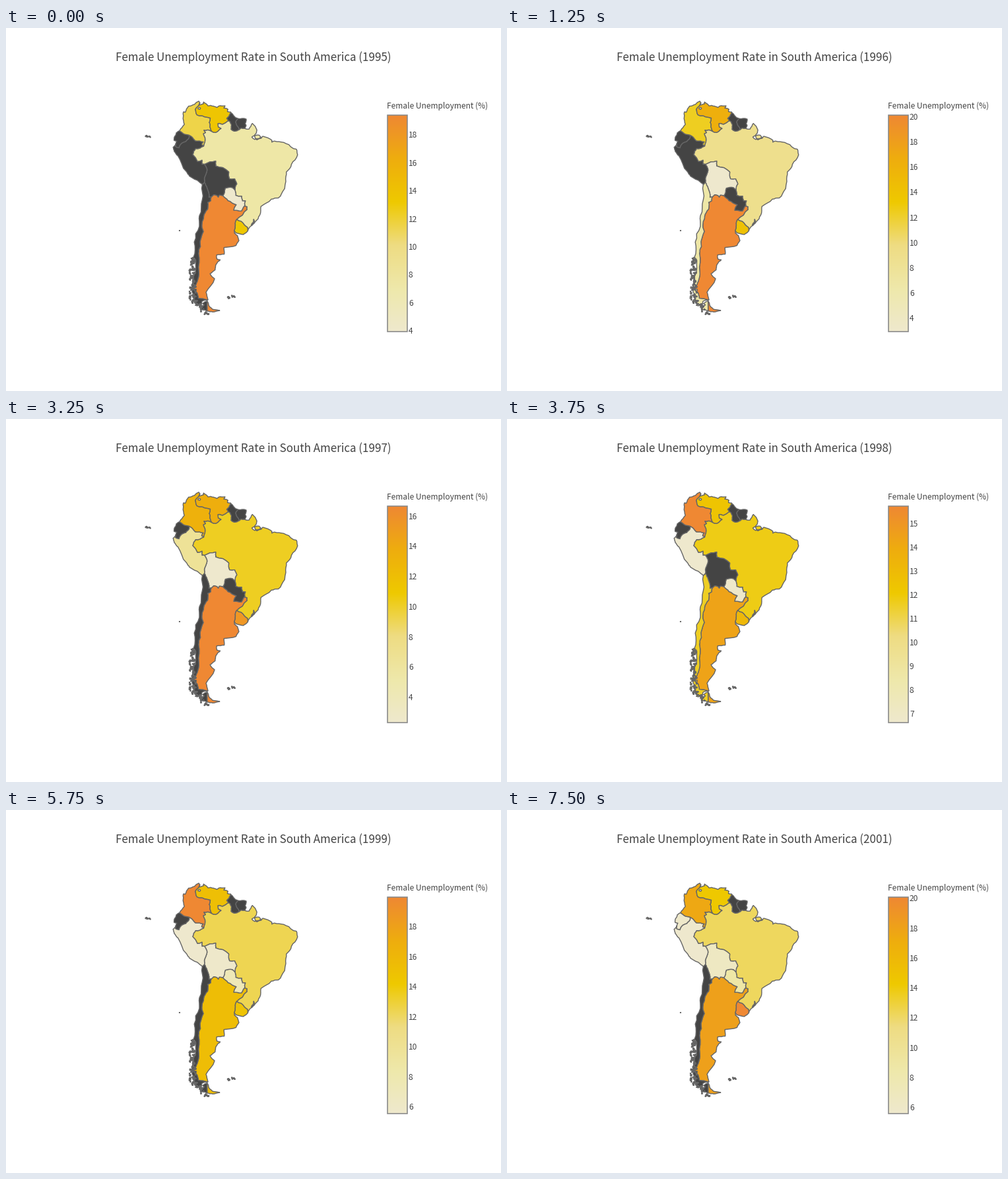
A matplotlib script for the animation above (8 s loop, 750 by 550 pixels).

```python
import numpy as np
import matplotlib.pyplot as plt
from matplotlib.animation import FuncAnimation
from matplotlib.colors import LinearSegmentedColormap
from matplotlib.patches import PathPatch, Rectangle
from matplotlib.path import Path

W, H, DPI = 750, 550, 100
PX = 72 / DPI
STEP_MS, STEPS_PER_YEAR, STEPS = 250, 5, 32
BAR_X, BAR_W, BAR_TOP, BAR_H = 578, 30, 132, 328
INK, EDGE, NO_DATA = "#444444", "#666666", "#444444"
plt.rcParams["font.family"] = ["Noto Sans CJK JP", "DejaVu Sans"]

rng = np.random.default_rng(4)
scale = LinearSegmentedColormap.from_list(
    "rate", ["#EEE8CD", "#EEE8AA", "#EEDC82", "#EEC900", "#EEAD0E", "#EF8833"], N=512)

# Unemployment in percent by year; countries left out have no data
rates = [
    dict(AR=19.43, BR=7.35, CO=11.5, PY=3.94, UY=13.5, VE=13.7),
    dict(AR=20.15, BO=2.94, BR=8.9, CL=6.7, CO=12.4, UY=14.3, VE=16.5),
    dict(AR=16.68, BO=2.33, BR=10.2, CO=13.4, PE=6.6, UY=15.5, VE=13.7),
    dict(AR=14.4, BR=11.8, CL=11.6, CO=15.74, PE=6.63, PY=6.8, UY=13.2, VE=12.4),
    dict(AR=15.4, BO=5.8, BR=12.4, CO=19.99, PE=5.55, PY=7.4, UY=14.8, VE=15.2),
    dict(AR=16.6, BO=6.1, CL=12.2, CO=18.17, EC=5.9, PE=4.94, UY=17.5, VE=13.3),
    dict(AR=18.2, BO=6.5, BR=12.2, CO=17.6, EC=5.9, PE=5.59, PY=8.8, UY=20.1, VE=14.4),
]


def arc(*lonlat):
    """Mercator line in pixels, roughened by midpoint displacement."""
    lon, lat = np.array(lonlat, float).reshape(-1, 2).T
    k = 4.057
    y = 161.6 - np.degrees(k * np.log(np.tan(np.pi / 4 + np.radians(lat) / 2)))
    p = np.column_stack([583 + k * lon, y])
    for _ in range(2):
        d = np.diff(p, axis=0)
        bump = rng.uniform(-0.1, 0.1, (len(d), 1))
        finer = np.empty((2 * len(p) - 1, 2))
        finer[::2] = p
        finer[1::2] = p[:-1] + d / 2 + bump * d[:, ::-1] * [1, -1]
        p = finer
    return p


def ring(first, *arcs):
    """Chain arcs, turning each so that it starts where the last one ended."""
    out = first
    for a in arcs:
        out = np.vstack([out, a if np.allclose(out[-1], a[0]) else a[::-1]])
    return out


def blob(x, y, r):
    a = np.linspace(0, 2 * np.pi, 8)[:-1]
    q = r * rng.uniform(0.6, 1.4, 7)
    return np.column_stack([x + q * np.cos(a), y + q * np.sin(a)])


def shape(*rings):
    return Path.make_compound_path(*[Path(np.vstack([r, r[:1]]), closed=True) for r in rings])


# Coasts
sea_br = arc(
    -51.7, 4.2, -50, 1.7, -50.3, 0.5, -51.9, -0.9, -50.8, -1.8, -48.5, -1.4, -47.8, -0.6,
    -44.4, -2.1, -44.4, -2.8, -43.4, -2.4, -40, -2.9, -36.5, -5.1, -35.2, -5.5, -34.8, -7.5,
    -37.1, -11, -39, -13.8, -39.2, -17.2, -41, -21.9, -42, -23, -44.6, -23.4, -48.5, -25.9,
    -48.9, -28.7, -50.7, -31, -52.3, -32.3, -53.4, -33.8)
sea_uy = arc(-53.4, -33.8, -55, -34.9, -57.8, -34.4, -58.4, -33.9)
sea_ar = arc(
    -58.4, -33.9, -58.4, -34.5, -57.2, -35.3, -56.7, -36.7, -57.8, -38.2, -62.3, -38.8,
    -62.2, -40.7, -65, -40.9, -64.9, -42.1, -63.7, -42.3, -65.2, -43.5, -65.6, -45,
    -67.5, -46, -65.8, -47.3, -69, -50.6, -68.3, -52.35)
sea_cl = arc(
    -70.4, -18.35, -70.4, -23.6, -71.5, -29, -71.5, -32.4, -73.4, -37.2, -73.7, -41.6,
    -72.8, -42.5, -73.6, -46.6, -74.2, -50.5, -72.9, -53.2, -71.2, -53.8, -70.5, -52.7,
    -68.3, -52.35)
sea_pe = arc(-80.3, -3.4, -81.3, -4.7, -80.9, -6.2, -79.5, -7.9, -76.3, -13.7, -75.2, -15.3,
             -71.4, -17.5, -70.4, -18.35)
sea_ec = arc(-78.9, 1.4, -80.1, 0.7, -80.9, -1.1, -80.9, -2.2, -79.9, -2.4, -80.3, -3.4)
sea_co = arc(-78.9, 1.4, -77.1, 3.8, -77.5, 6.7, -77.4, 8.5, -76.8, 8.3, -75.5, 10.6,
             -73.4, 11.2, -71.7, 12.4, -71.3, 11.8)
sea_ve = arc(-71.3, 11.8, -71.6, 11, -70, 11.4, -69.9, 12.1, -68.3, 10.7, -66.2, 10.6, -65, 10.1,
             -64.3, 10.6, -61.9, 10.7, -62.4, 9.9, -60.8, 9.4, -61, 8.6, -59.8, 8.4)
sea_gy = arc(-59.8, 8.4, -58.5, 6.9, -57.1, 6)
sea_sr = arc(-57.1, 6, -54, 5.8, -54.4, 4.2, -54, 3.4, -54.5, 2.3)

# Land borders
uy_br = arc(-53.4, -33.8, -53.5, -32.7, -55.7, -30.9, -57.6, -30.2)
ar_br = arc(-57.6, -30.2, -53.7, -26.9, -53.7, -26, -54.6, -25.7)
py_br = arc(-54.6, -25.7, -54.3, -24, -55.4, -24, -55.7, -22.4, -57.9, -22.1, -58.2, -20.2)
bo_br = arc(-58.2, -20.2, -57.5, -18.1, -58.3, -16.3, -60.2, -16.3, -60.5, -13.8, -65.4, -11.6,
            -65.4, -9.8, -69.5, -11)
pe_br = arc(-69.5, -11, -70.5, -11, -70.5, -9.5, -72.2, -10, -74, -7.4, -72.9, -5.2, -69.9, -4.3)
co_br = arc(-69.9, -4.3, -69.4, -1.1, -70, 0.4, -69.2, 0.8, -69.8, 1.7, -67.9, 1.7, -66.9, 1.25)
ve_br = arc(-66.9, 1.25, -65.5, 0.8, -63.4, 2.3, -64.4, 2.8, -64.6, 4.1, -62.8, 3.9, -60.7, 5.2)
gy_br = arc(-60.7, 5.2, -60, 4.8, -59.6, 3.9, -59.7, 2, -58.6, 1.3, -56.5, 1.9)
sr_br = arc(-56.5, 1.9, -55.9, 2.4, -54.5, 2.3)
gap_br = arc(-54.5, 2.3, -52.9, 2.1, -51.7, 4.2)
uy_ar = arc(-57.6, -30.2, -58.1, -32.5, -58.4, -33.9)
cl_ar = arc(
    -68.3, -52.35, -71.9, -52, -72.4, -50.7, -73.4, -50.2, -73.4, -49.2, -72.3, -48, -71.7, -45.5,
    -71.8, -40.5, -71.1, -38.5, -71.1, -36.6, -70, -34, -70.5, -31.4, -69.9, -29.2, -68.4, -26.8,
    -68.4, -24.5, -67.3, -24, -67.1, -22.7)
bo_ar = arc(-67.1, -22.7, -66.2, -21.9, -65, -22.1, -64.4, -22.7, -64, -22, -62.7, -22.2)
py_ar = arc(-62.7, -22.2, -60.8, -23.9, -57.7, -25.3, -58.6, -27.2, -55.8, -27.4, -54.6, -25.7)
bo_py = arc(-62.7, -22.2, -61.8, -19.6, -59.1, -19.4, -58.2, -20.2)
cl_bo = arc(-67.1, -22.7, -67.9, -22.8, -68.6, -19.6, -69.6, -17.6)
cl_pe = arc(-69.6, -17.6, -70.4, -18.35)
bo_pe = arc(-69.6, -17.6, -69.2, -15, -68.7, -12.5, -69.5, -11)
pe_ec = arc(-80.3, -3.4, -80.4, -4.4, -79.1, -4.9, -78, -3.1, -76.6, -2.6, -75.3, -1, -75.4, -0.15)
pe_co = arc(-75.4, -0.15, -74.3, -0.8, -73, -2.3, -70, -2.7, -70.6, -3.8, -69.9, -4.3)
ec_co = arc(-75.4, -0.15, -77.5, 0.4, -78.9, 1.4)
co_ve = arc(-71.3, 11.8, -73, 9.4, -72.4, 7.4, -70.3, 7, -67.4, 6.2, -67.8, 4.6, -67.5, 2.7,
            -66.9, 1.25)
gy_sr = arc(-57.1, 6, -57.9, 4.6, -57.3, 3.2, -56.5, 1.9)

# Tierra del Fuego, split by a straight border
fuego_ar = arc(-68.6, -52.65, -67.75, -53.85, -66.4, -54.5, -63.9, -54.75, -66.5, -55.05, -68.6, -54.87)
fuego_cl = arc(-68.6, -52.65, -70.3, -53.2, -69.6, -53.5, -71.2, -54.4, -68.6, -54.87)
patos = arc(-51.2, -30.1, -50.9, -30.8, -52.1, -32, -51.3, -30.9, -51.2, -30.1)


def fjords(n):
    """Small islands between the outer and the inner line of the southern coast."""
    rows = [347, 374, 410, 428, 436]
    west, east = [281, 277.5, 278, 289, 305], [285, 287, 288, 303, 309]
    for y in rng.uniform(348, 434.5, n):
        x = rng.uniform(np.interp(y, rows, west), np.interp(y, rows, east))
        yield blob(x, y, rng.uniform(0.4, 1.5))


def islets(x, y, dx, dy, r, n):
    return [blob(x + rng.uniform(-dx, dx), y + rng.uniform(-dy, dy), r) for _ in range(n)]


land = {
    "GY": shape(ring(sea_gy, gy_sr, gy_br, ve_gy := arc(
        -60.7, 5.2, -61.3, 6, -60.4, 7, -59.8, 8.4))),
    "SR": shape(ring(sea_sr, sr_br, gy_sr)),
    "FK": shape(*islets(338, 408, 2.6, 1.8, 0.7, 5), *islets(345, 407, 2.6, 2, 0.7, 5)),
    "BR": shape(ring(sea_br, uy_br, ar_br, py_br, bo_br, pe_br, co_br, ve_br, gy_br, sr_br, gap_br),
                blob(381, 165.5, 3.8)),
    "AR": shape(ring(sea_ar, cl_ar, bo_ar, py_ar, ar_br, uy_ar), fuego_ar),
    "UY": shape(ring(sea_uy, uy_ar, uy_br)),
    "PY": shape(ring(py_ar, py_br, bo_py)),
    "BO": shape(ring(bo_ar, bo_py, bo_br, bo_pe, cl_bo)),
    "PE": shape(ring(sea_pe, cl_pe, bo_pe, pe_br, pe_co, pe_ec)),
    "EC": shape(ring(sea_ec, pe_ec, ec_co), blob(212.5, 163.6, 1.3), *islets(216, 164.8, 4, 1, 0.6, 4)),
    "CO": shape(ring(sea_co, co_ve, co_br, pe_co, ec_co)),
    "VE": shape(ring(sea_ve, ve_gy, ve_br, co_ve)),
    "CL": shape(ring(sea_cl, cl_ar, cl_bo, cl_pe), fuego_cl, blob(283.5, 353, 2.5),
                blob(263, 307, 0.4), *fjords(110)),
}

fig = plt.figure(figsize=(W / DPI, H / DPI), dpi=DPI, facecolor="white")
ax = fig.add_axes([0, 0, 1, 1])
ax.axis("off")


def label(x, y, text, size, ha="left"):
    return ax.text(x, y, text, fontsize=size * PX, color=INK, ha=ha, va="baseline")


def outline(path, color):
    return ax.add_patch(PathPatch(path, fc=color, ec=EDGE, lw=1.4 * PX, joinstyle="round"))


countries = {name: outline(path, NO_DATA) for name, path in land.items()}
for water in (blob(292.5, 121.5, 1.8), patos):
    outline(shape(water), "white")

ax.imshow(np.linspace(1, 0, BAR_H)[:, None], cmap=scale, aspect="auto", interpolation="nearest",
          extent=(BAR_X, BAR_X + BAR_W, BAR_TOP + BAR_H, BAR_TOP))
ax.add_patch(Rectangle((BAR_X, BAR_TOP), BAR_W, BAR_H, fc="none", ec="#888888", lw=1.6 * PX))
ax.set_xlim(0, W)
ax.set_ylim(H, 0)

title = label(375, 50, "", 17, "center")
label(577, 122, "Female Unemployment (%)", 12)
tick_labels = [label(610, 0, "", 12) for _ in range(9)]


def update(i):
    year = i // STEPS_PER_YEAR
    row = rates[year]
    low, high = min(row.values()), max(row.values())
    title.set_text(f"Female Unemployment Rate in South America ({1995 + year})")
    for name, patch in countries.items():
        patch.set_facecolor(scale((row[name] - low) / (high - low)) if name in row else NO_DATA)

    step = 1 if high - low < 10 else 2
    first = int(np.ceil(low / step)) * step
    for n, text in enumerate(tick_labels):
        value = first + n * step
        text.set_text(str(value) if value <= high else "")
        text.set_y(BAR_TOP + BAR_H * (high - value) / (high - low) + 4.2)
    return [title, *countries.values(), *tick_labels]


anim = FuncAnimation(fig, update, frames=STEPS, interval=STEP_MS, repeat=True, repeat_delay=0)
plt.show()
```
